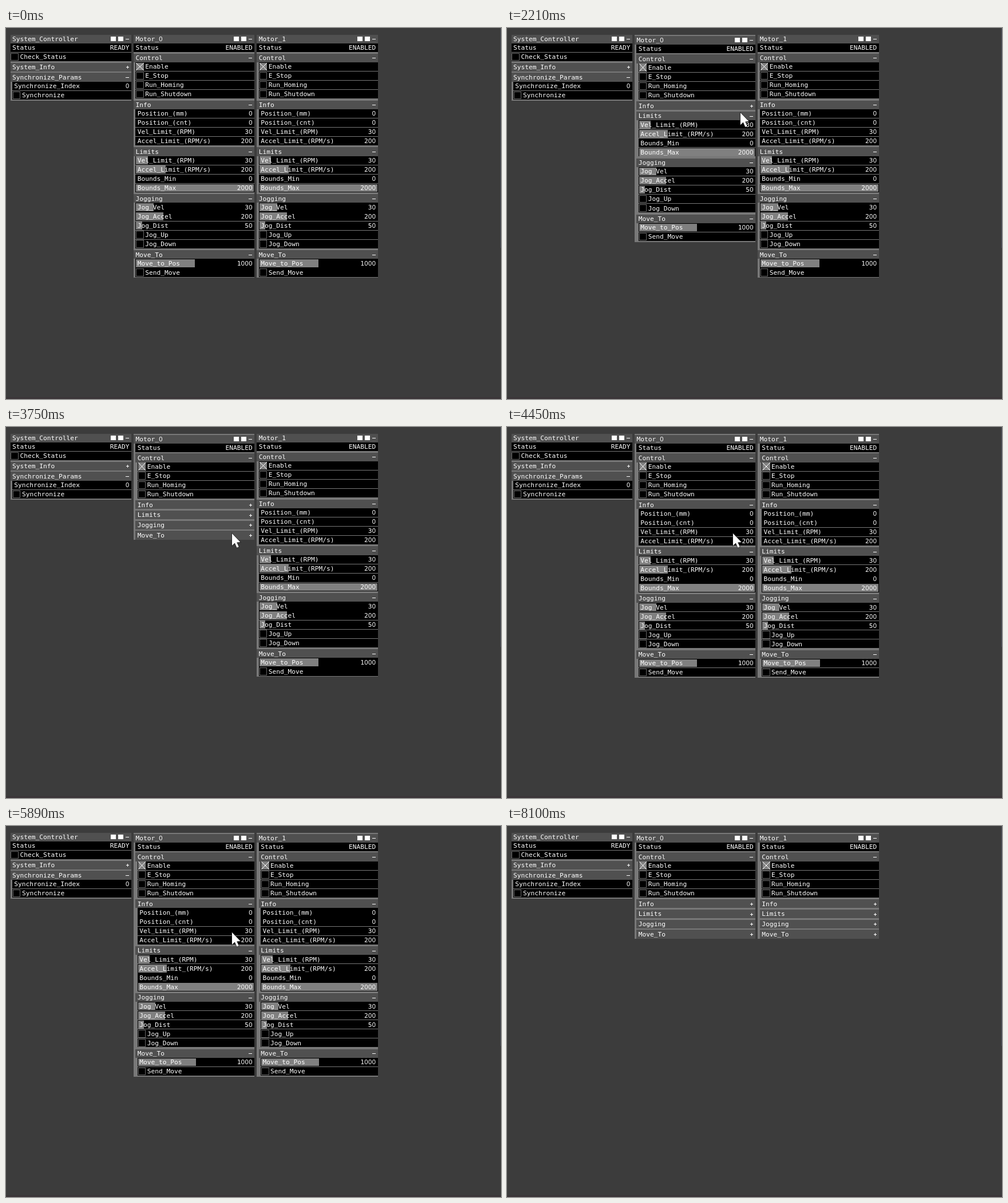
An HTML page with a canvas that plays this animation: 865 by 648 pixels, repeating every 8600 ms.

```html
<!DOCTYPE html>
<html lang="en">
<head>
<meta charset="utf-8">
<title>Motor control panels</title>
<style>
html, body { margin: 0; width: 100%; height: 100%; overflow: hidden; background: #3c3c3c; }
canvas { display: block; }
</style>
</head>
<body>
<canvas id="stage" width="865" height="648"></canvas>
<script>
const ctx = document.getElementById('stage').getContext('2d');
const LOOP = 8600;
// Layout is in 1024 x 768 units, snapped to stage pixels.
const SX = 865 / 1024, SY = 648 / 768;
const WIDTH = 250, ROW = 18, PAD = 4, CHAR = 6.75;
const HEADER = '#505050', BORDER = '#787878', FILL = '#808080';

// Rows: [name, boolean] is a checkbox, [name, value, fill] a label or slider.
const systemRows = [['Status', 'READY'], ['Check_Status', false]];
const systemGroups = [
  ['System_Info', []],
  ['Synchronize_Params', [['Synchronize_Index', '0'], ['Synchronize', false]]]
];
const motorRows = [['Status', 'ENABLED']];
const motorGroups = [
  ['Control', [['Enable', true], ['E_Stop', false], ['Run_Homing', false], ['Run_Shutdown', false]]],
  ['Info', [['Position_(mm)', '0'], ['Position_(cnt)', '0'],
    ['Vel_Limit_(RPM)', '30'], ['Accel_Limit_(RPM/s)', '200']]],
  ['Limits', [['Vel_Limit_(RPM)', '30', .1], ['Accel_Limit_(RPM/s)', '200', .25],
    ['Bounds_Min', '0', 0], ['Bounds_Max', '2000', 1]]],
  ['Jogging', [['Jog_Vel', '30', .15], ['Jog_Accel', '200', .233], ['Jog_Dist', '50', .05],
    ['Jog_Up', false], ['Jog_Down', false]]],
  ['Move_To', [['Move_to_Pos', '1000', .5], ['Send_Move', false]]]
];

function box(x, y, w, h, color) {
  const left = Math.round(x * SX), top = Math.round(y * SY);
  ctx.fillStyle = color;
  ctx.fillRect(left, top, Math.round((x + w) * SX) - left, Math.round((y + h) * SY) - top);
}

function text(str, x, y, alignRight) {
  const left = x * SX - (alignRight ? str.length * CHAR : 0);
  const base = Math.round((y + ROW / 2) * SY + 3.8);
  ctx.fillStyle = '#fff';
  ctx.textAlign = 'center';
  [...str].forEach((c, i) => {
    // A plain zero needs a face without a dot inside it.
    ctx.font = c === '0' ? '11.2px "Liberation Sans", sans-serif'
                         : '11.2px "DejaVu Sans Mono", monospace';
    ctx.fillText(c, left + (i + .5) * CHAR, base - (c === '_' ? 1 : 0));
  });
}

function header(name, x, y, right, open) {
  box(x, y, right - x, ROW, HEADER);
  text(name, x + PAD, y);
  const cx = Math.round(right * SX) - 7, cy = Math.round((y + ROW / 2) * SY);
  ctx.fillStyle = '#fff';
  if (open) ctx.fillRect(cx - 3, cy, 6, 1);
  else {
    ctx.fillRect(cx - 2, cy, 5, 1);
    ctx.fillRect(cx, cy - 2, 1, 5);
  }
}

function checkbox(x, y, on) {
  box(x + 1, y + 1, 16, 16, on ? FILL : '#686868');
  const left = Math.round((x + 1) * SX), top = Math.round((y + 1) * SY);
  const right = Math.round((x + 17) * SX), bottom = Math.round((y + 17) * SY);
  if (!on) {
    ctx.fillStyle = '#000';
    ctx.fillRect(left + 1, top + 1, right - left - 2, bottom - top - 2);
    return;
  }
  ctx.strokeStyle = '#fff';
  ctx.lineWidth = 1;
  ctx.beginPath();
  ctx.moveTo(left, top); ctx.lineTo(right, bottom);
  ctx.moveTo(right, top); ctx.lineTo(left, bottom);
  ctx.stroke();
}

function row([name, value, fill], x, y, right) {
  box(x, y, right - x, ROW, '#000');
  if (typeof value === 'boolean') {
    checkbox(x, y, value);
    text(name, x + PAD + 16, y);
  } else {
    if (fill) box(x + 1, y + 1, (right - x - 2) * fill, ROW - 2, FILL);
    text(name, x + PAD, y);
    text(value, right - PAD, y, true);
  }
}

// An inset panel has been laid out again and gains a left and top border.
function panel(name, x, rows, groups, isOpen, inset) {
  const right = x + WIDTH, childX = x + (inset ? 4 : 0);
  const top = inset ? 16 : 14;
  const size = (g, i) => ROW + (isOpen(i) ? 19 * g[1].length : 0);
  const end = groups.reduce((y, g, i) => y + 3 + size(g, i), top + ROW + 19 * rows.length - 1);
  // Plain rows end one unit earlier when a second one follows.
  box(x, 14, WIDTH, end + 1 - 14, BORDER);

  header(name, x, top, right, true);
  const edge = Math.round(right * SX), iconY = Math.round(top * SY) + 3;
  ctx.fillStyle = '#fff';
  ctx.fillRect(edge - 36, iconY, 9, 8);
  ctx.fillRect(edge - 23, iconY, 9, 8);

  let y = top + ROW;
  for (const r of rows) { row(r, childX, y, right); y += 19; }
  y += 2;
  groups.forEach((g, i) => {
    header(g[0], childX, y, right, isOpen(i));
    if (isOpen(i)) g[1].forEach((r, k) => row(r, childX + 4, y + ROW + 19 * k, right));
    y += size(g, i) + 3;
  });
}

// Cursor tip: [time, x, y]
const path = [
  [80, 516, 459], [300, 462, 330], [560, 398, 180], [700, 391, 140], [820, 400, 128],
  [920, 406, 131], [950, 408, 132], [1740, 408, 132], [1940, 408, 146],
  [2140, 408, 147], [2210, 408, 148], [2460, 408, 148], [2910, 395, 171],
  [3290, 395, 171], [3480, 395, 186], [7880, 395, 186], [7950, 430, 250],
  [8000, 510, 400], [8060, 630, 625], [8100, 650, 660]
];
const arrow = [[0, 0], [0, 21], [4.8, 16.6], [8.4, 24.8], [11.8, 23.2], [8.2, 15.4], [14.4, 15]];

function cursor(t) {
  const i = path.findIndex(p => p[0] > t);
  if (i < 1) return;
  const [t0, x0, y0] = path[i - 1], [t1, x1, y1] = path[i];
  const k = (t - t0) / (t1 - t0);
  const x = Math.round(x0 + (x1 - x0) * k), y = Math.round(y0 + (y1 - y0) * k);
  ctx.beginPath();
  arrow.forEach(([dx, dy]) => ctx.lineTo(x + dx, y + dy));
  ctx.closePath();
  ctx.lineWidth = 1.5;
  ctx.strokeStyle = '#222';
  ctx.stroke();
  ctx.fillStyle = '#fff';
  ctx.fill();
}

// Times at which the groups of the first motor are folded one by one.
const foldAt = [Infinity, 1320, 2400, 3010, 3650];
const SYNC = 4450;

function draw(t) {
  ctx.fillStyle = '#3c3c3c';
  ctx.fillRect(0, 0, 865, 648);
  ctx.fillStyle = '#3b3538';
  ctx.fillRect(0, 645, 865, 3);
  ctx.fillStyle = '#4a4e58';
  ctx.fillRect(864, 0, 1, 384);

  const allOpen = t < 5020 || (t >= 5890 && t < 6760);
  const synced = t >= SYNC;
  const syncedOpen = i => i === 0 || allOpen;
  panel('System_Controller', 9, systemRows, systemGroups, i => i === 1, false);
  panel('Motor_0', 264, motorRows, motorGroups,
    synced ? syncedOpen : i => t < foldAt[i], t >= foldAt[1]);
  panel('Motor_1', 519, motorRows, motorGroups,
    synced ? syncedOpen : () => true, synced);
  cursor(t);
}

const start = performance.now();
function tick() {
  draw((performance.now() - start) % LOOP);
  requestAnimationFrame(tick);
}
tick();
</script>
</body>
</html>
```
